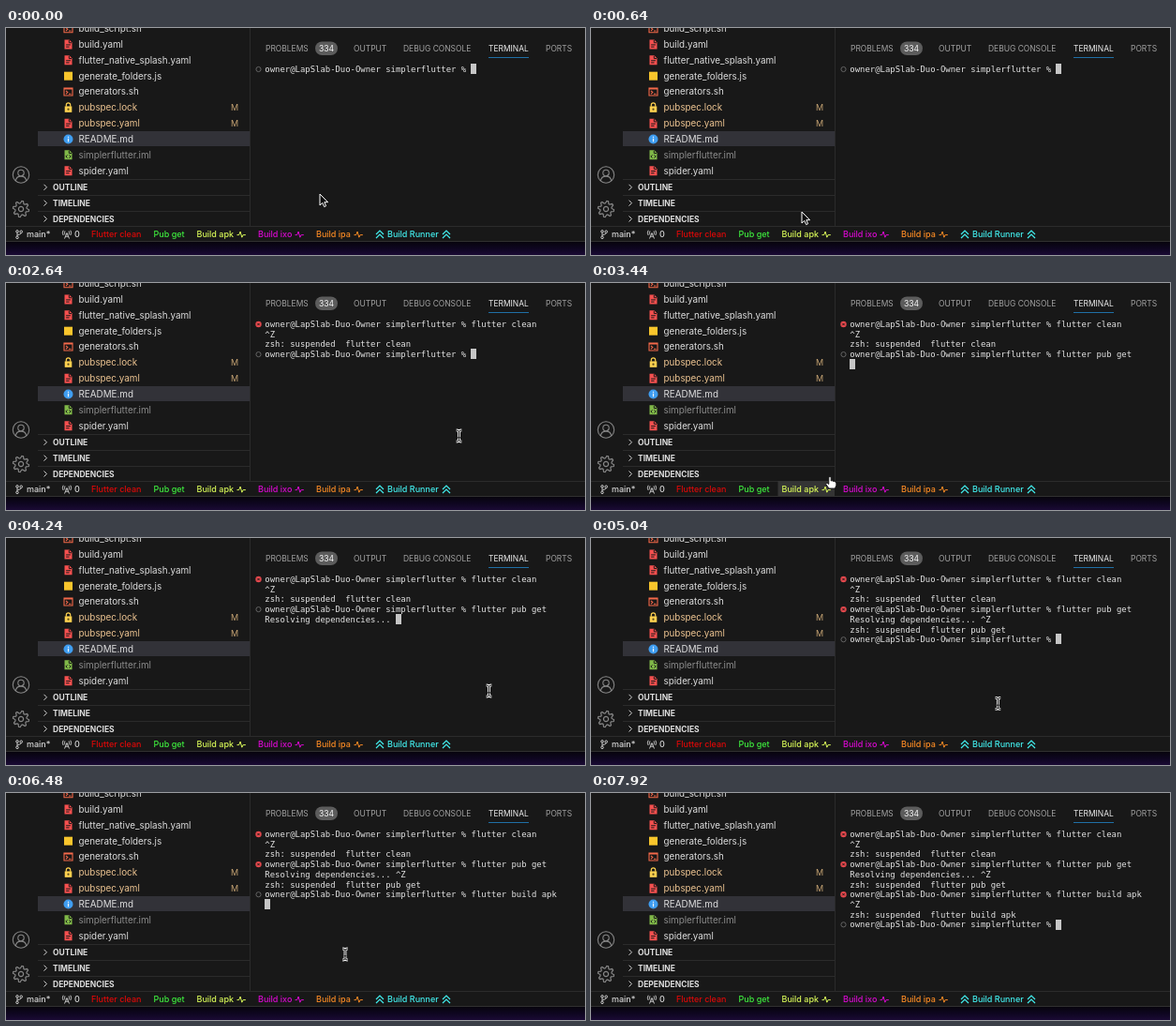
Animation, 618 px wide and 242 px high, one loop 8000 ms. Source, as an HTML page with a canvas:

```html
<!DOCTYPE html>
<html>
<head>
<meta charset="utf-8">
<style>
html, body { margin: 0; width: 100%; height: 100%; overflow: hidden; background: #181818; }
canvas { display: block; }
</style>
</head>
<body>
<canvas id="stage" width="618" height="242"></canvas>
<script>
const ctx = document.getElementById('stage').getContext('2d');
const LOOP = 8000, STEP = 80;
const UI = 'Inter, "Liberation Sans", sans-serif';
const MONO = '8.94px "DejaVu Sans Mono", monospace';
const ROW = 16.83, CHAR = 5.382, LINE = 10.7;

function rect(x, y, w, h, color) {
  ctx.fillStyle = color;
  ctx.fillRect(x, y, w, h);
}
function text(x, y, str, color, font) {
  ctx.font = font;
  ctx.fillStyle = color;
  ctx.fillText(str, x, y);
}
function disc(x, y, r, color) {
  ctx.fillStyle = color;
  ctx.beginPath();
  ctx.arc(x, y, r, 0, 7);
  ctx.fill();
}
// Draws an SVG path at (x, y), stroked and/or filled.
function icon(x, y, d, stroke, width = 1, fill) {
  const path = new Path2D(d);
  ctx.save();
  ctx.translate(x, y);
  if (fill) { ctx.fillStyle = fill; ctx.fill(path); }
  if (stroke) { ctx.strokeStyle = stroke; ctx.lineWidth = width; ctx.stroke(path); }
  ctx.restore();
}
const ring = r => `M${r} 0A${r} ${r} 0 1 1 ${-r} 0A${r} ${r} 0 1 1 ${r} 0`;
const page = 'M-4-5h5l3 3v7h-8z';

const fileIcons = {
  shell(x, y) {
    icon(x, y, 'M-4.5-4h9v8h-9zM-4.5-3h9M-2.5-1l1.8 1.6L-2.5 2.3M.5 2.3h2.5', '#f4694a', 1.1);
  },
  sheet(x, y) {
    icon(x, y, page, 0, 0, '#f5504f');
    icon(x, y, 'M.8-4.6v2.8h2.8M-2.4.4h4.8M-2.4 2.6h3.4', '#181818', 1);
  },
  script(x, y) { rect(x - 4.5, y - 4.5, 9, 9, '#f8c52c'); },
  lock(x, y) {
    icon(x, y, 'M-2.2-1v-1.8a2.2 2.2 0 0 1 4.4 0V-1', '#fbd04f', 1.2);
    rect(x - 3.8, y - 1.4, 7.6, 6.4, '#fbd04f');
    disc(x, y + 1.8, 1.1, '#5a4818');
  },
  info(x, y) {
    disc(x, y, 5, '#3f9df0');
    rect(x - 0.6, y - 0.8, 1.2, 3.6, '#f0f4f8');
    rect(x - 0.6, y - 2.8, 1.2, 1.2, '#f0f4f8');
  },
  module(x, y) {
    icon(x, y, page, 0, 0, '#80b848');
    icon(x, y, 'M.8-4.6v2.8h2.8M-1 0L-2.6 1.6L-1 3.2M1 0L2.6 1.6L1 3.2', '#181818', 1);
  }
};

const files = [
  ['build_script.sh', 'shell'], ['build.yaml', 'sheet'],
  ['flutter_native_splash.yaml', 'sheet'], ['generate_folders.js', 'script'],
  ['generators.sh', 'shell'], ['pubspec.lock', 'lock', '#eec592'],
  ['pubspec.yaml', 'sheet', '#eec592'], ['README.md', 'info'],
  ['simplerflutter.iml', 'module', '#8c8c8c'], ['spider.yaml', 'sheet']
];

function drawSidebar() {
  rect(34, 110, 226, 16, '#323238');
  files.forEach(([name, kind, color], i) => {
    const y = 0.7 + i * ROW;
    fileIcons[kind](66.5, y);
    text(77.5, y + 3.4, name, color || '#dedede', '9.85px ' + UI);
    if (name.startsWith('pubspec')) text(240, y + 3.2, 'M', '#c4a272', '9px ' + UI);
  });
  ['OUTLINE', 'TIMELINE', 'DEPENDENCIES'].forEach((name, i) => {
    const y = 169.8 + i * ROW;
    rect(34, Math.round(y - 8.6), 226, 1, '#2b2b2b');
    icon(42, y, 'M-1.5-3l3 3l-3 3', '#d4d4d4');
    text(50, y + 3.1, name, '#dedede', 'bold 8.5px ' + UI);
  });
  rect(260, 0, 1, 211, '#2b2b2b');

  icon(16, 156.5, ring(8.7) + 'M3.2-2A3.2 3.2 0 1 1-3.2-2A3.2 3.2 0 1 1 3.2-2M-5.6 6.5C-5 0 5 0 5.6 6.5', '#868686', 1.1);
  let gear = '';
  for (let i = 0; i < 32; i++) {
    const r = i % 4 < 2 ? 8.6 : 6.2, a = (i + 0.5) * Math.PI / 16;
    gear += (i ? 'L' : 'M') + r * Math.cos(a) + ' ' + r * Math.sin(a);
  }
  icon(16, 193, gear + 'Z' + ring(2.6), '#868686', 1.2);
}

function drawTabs() {
  const tabs = [[277, 'PROBLEMS'], [371, 'OUTPUT'], [424, 'DEBUG CONSOLE'], [515, 'TERMINAL'], [576, 'PORTS']];
  for (const [x, name] of tabs) {
    text(x, 25, name, name === 'TERMINAL' ? '#ececec' : '#a2a2a2', '8.45px ' + UI);
  }
  ctx.fillStyle = '#5c5c5c';
  ctx.beginPath();
  ctx.roundRect(330, 14.5, 24, 14.5, 7.2);
  ctx.fill();
  text(334, 25, '334', '#f8f8f8', '8.6px ' + UI);
  rect(515, 31, 43, 1, '#1f6fa5');
}

const prompt = 'owner@LapSlab-Duo-Owner simplerflutter % ';
const jobs = [
  { cmd: 'flutter clean', run: 1200, stop: 2480 },
  { cmd: 'flutter pub get', run: 3360, stop: 4480, out: 'Resolving dependencies... ', outAt: 3600 },
  { cmd: 'flutter build apk', run: 5760, stop: 7520 }
];

function drawTerminal(t) {
  const lines = [];
  let stopped = true;
  const mark = failed => {
    const y = 44 + lines.length * LINE;
    if (failed) {
      disc(269.5, y, 3.2, '#e5484d');
      icon(269.5, y, 'M-1.2-1.2L1.2 1.2M1.2-1.2L-1.2 1.2', '#181818', 0.9);
    } else icon(269.5, y, ring(2.6), '#6a6a6a', 0.9);
  };
  for (const job of jobs) {
    if (t < job.run) break;
    stopped = t >= job.stop;
    mark(stopped);
    lines.push(prompt + job.cmd);
    lines.push((t >= job.outAt ? job.out : '') + (stopped ? '^Z' : ''));
    if (!stopped) break;
    lines.push('zsh: suspended  ' + job.cmd);
  }
  if (stopped) {
    mark(false);
    lines.push(prompt);
  }
  lines.forEach((line, i) => text(276.3, 47 + i * LINE, line, '#e4e4e4', MONO));
  const last = lines.length - 1;
  rect(Math.floor(276.2 + lines[last].length * CHAR), Math.round(38.2 + last * LINE), 6, 11, '#c6c6c6');
}

// label x, label, colour, hover left, hover right, pulse x
const buttons = [
  [91, 'Flutter clean', '#dc0808', 87, 149],
  [157.5, 'Pub get', '#3eec3e', 154, 195],
  [203.5, 'Build apk', '#d8f858', 199.5, 260, 251],
  [269, 'Build ixo', '#d808d0', 265, 322, 313],
  [331, 'Build ipa', '#f88a24', 327, 384, 376],
  [407, 'Build Runner', '#42eeee', 390, 478]
];

function drawStatus(pointer) {
  rect(0, 211, 618, 17, '#181818');
  rect(0, 211, 618, 1, '#2b2b2b');
  const font = '500 9px ' + UI;
  icon(14, 220, 'M-2-1.8V2M-2 1.2C-2-.2 2.2.8 2.2-1.6M-.7-3.1a1.3 1.3 0 1 1-2.6 0a1.3 1.3 0 1 1 2.6 0M-.7 3.3a1.3 1.3 0 1 1-2.6 0a1.3 1.3 0 1 1 2.6 0M3.5-2.8a1.3 1.3 0 1 1-2.6 0a1.3 1.3 0 1 1 2.6 0', '#d6d6d6', 0.9);
  text(22, 223.3, 'main*', '#d6d6d6', font);
  icon(65, 220, 'M-2.5 4.5L0-1.5L2.5 4.5M-1.6 2.2h3.2M-2-3.5Q-3.2-1.5-2 .3M2-3.5Q3.2-1.5 2 .3M-3.8-4.3Q-5.5-1.5-3.8 1M3.8-4.3Q5.5-1.5 3.8 1', '#d6d6d6', 0.9);
  text(73, 223.3, '0', '#d6d6d6', font);
  for (const [x, label, color, left, right, pulse] of buttons) {
    if (pointer && pointer.y >= 211 && pointer.x >= left && pointer.x <= right) {
      rect(left, 211, right - left, 17, '#343434');
    }
    text(x, 223.3, label, color, font);
    if (pulse) icon(pulse, 220, 'M-4.5.6h2.2L-.9-3L.8 3.2L2.1.6H4.8', color, 1);
  }
  for (const x of [399, 470]) icon(x, 220, 'M-4 0L0-4L4 0M-4 4L0 0L4 4', '#42eeee', 1.2);
}

function drawDesktop() {
  const g = ctx.createLinearGradient(0, 228, 0, 242);
  g.addColorStop(0, '#07040d');
  g.addColorStop(0.5, '#0e0620');
  g.addColorStop(1, '#1a0a34');
  rect(0, 228, 618, 14, g);
  rect(0, 227, 618, 1, '#303030');
}

// time, x, y
const route = [
  [320, 335, 177], [960, 115, 215], [1200, 115, 215], [1440, 483.5, 163],
  [2640, 483.5, 163], [3200, 174, 215], [3280, 174, 215], [3360, 235, 213],
  [3440, 255, 207], [3760, 515.5, 163], [4800, 515.5, 163], [5680, 218, 212],
  [5840, 218, 212], [6400, 362, 172], [6560, 362, 172], [6800, 447, 154]
];

// Typing in the terminal hides the pointer until it moves again.
function pointerAt(t) {
  if (t >= 7520 || (t >= 2480 && t < 2640)) return null;
  const next = route.findIndex(p => p[0] > t);
  if (next === 0) return { x: route[0][1], y: route[0][2] };
  if (next < 0) return { x: route.at(-1)[1], y: route.at(-1)[2] };
  const [t0, x0, y0] = route[next - 1], [t1, x1, y1] = route[next];
  const k = (t - t0) / (t1 - t0);
  return { x: x0 + (x1 - x0) * k, y: y0 + (y1 - y0) * k };
}

function drawPointer({ x, y }, t) {
  if (y >= 205 && x < 480) {
    icon(x, y, 'M-1.2 0Q0-1.4 1.2 0V4Q2.4 3 3.3 4.5Q4.5 3.6 5.2 5Q6.5 4.5 6.8 6V8.5L5.5 12H-1L-4.2 7.6Q-4.4 5.8-2.6 6.4L-1.2 7.5Z', '#111111', 0.9, '#ffffff');
  } else if (x < 261 || t <= 320) {
    icon(x, y, 'M0 0V12L2.8 9.4L4.7 13.6L6.6 12.7L4.8 8.7H8.6Z', '#ffffff', 1, '#0a0a0a');
  } else {
    const beam = 'M-2.8-6Q0-6 0-4.5Q0-6 2.8-6M0-4.8V4.8M-2.8 6Q0 6 0 4.5Q0 6 2.8 6M-1.5 1.8h3';
    icon(x, y, beam, '#ffffff', 2.8);
    icon(x, y, beam, '#101010', 1);
  }
}

function frame(now) {
  const t = Math.floor(now % LOOP / STEP) * STEP;
  const pointer = pointerAt(t);
  rect(0, 0, 618, 242, '#181818');
  drawSidebar();
  drawTabs();
  drawTerminal(t);
  drawStatus(pointerAt(t - STEP));
  drawDesktop();
  if (pointer) drawPointer(pointer, t);
  requestAnimationFrame(frame);
}
requestAnimationFrame(frame);
</script>
</body>
</html>
```
